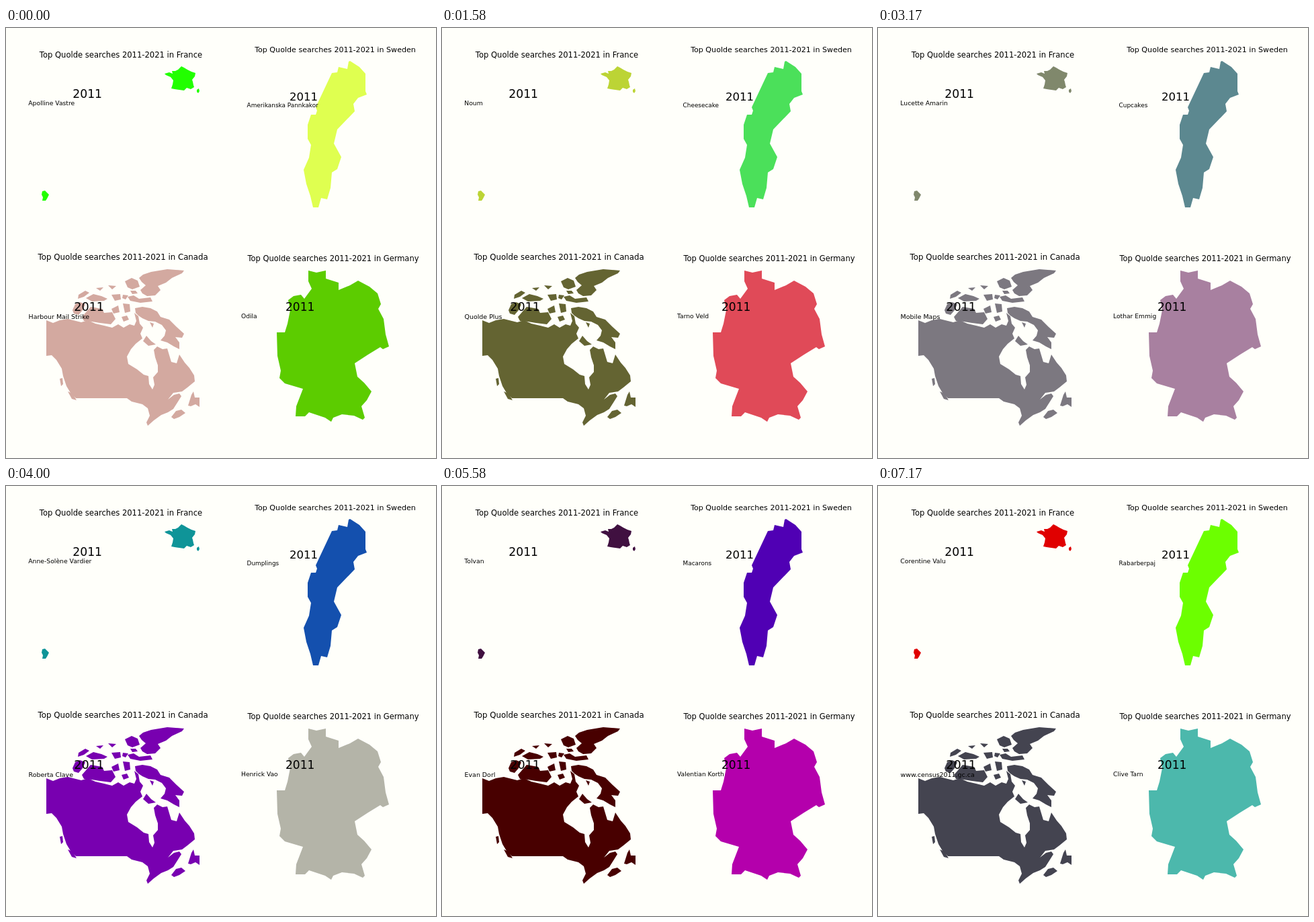
Recreate the animation shown at these times as an HTML page. Size 640 by 640 pixels, loop 8 s.

```html
<!DOCTYPE html>
<html lang="en">
<head>
<meta charset="utf-8">
<title>Top searches by country</title>
<style>
html, body { margin: 0; width: 100%; height: 100%; overflow: hidden; background: #fffffa; }
svg { display: block; width: 100%; height: 100%; }
text { font-family: "DejaVu Sans", sans-serif; fill: #000; }
.title { text-anchor: middle; }
</style>
</head>
<body>
<svg viewBox="0 0 640 640">
  <g id="France">
    <path d="M236 68L243 66 248 68 247 64 252 64 256 62 261 57 265 59 270 62 276 65 282 67 281 72 277 77 278 80 279 85 280 88 275 91 269 89 265 93 258 92 251 91 246 90 248 84 249 78 245 73 238 70Z"/>
    <path d="M284 92L287 90 288 94 286 97 284 95Z"/>
    <path d="M54 243L58 242 61 245 64 248 61 254 59 257 54 257 55 252 53 248Z"/>
  </g>
  <g id="Sweden">
    <path d="M512 49L526 58 535 68 535 94 537 99 524 104 517 113 519 124 493 151 488 172 499 192 493 210 485 215 483 238 478 255 469 253 465 267 457 267 453 250 447 232 443 211 451 193 454 174 449 165 449 144 454 129 461 129 463 123 461 118 485 67 493 66 495 58 508 61 510 50Z"/>
  </g>
  <g id="Canada">
    <path d="M60 435L70 439 80 435 92 433 100 435 112 438 122 435 133 440 146 443 158 446 167 441 175 446 184 441 191 443 194 436 191 424 197 429 199 440 204 446 200 455 203 462 193 470 186 478 180 489 182 500 195 508 205 516 212 518 213 530 218 538 221 531 219 520 226 512 226 502 222 490 220 479 225 474 233 478 240 477 243 487 246 497 254 499 258 486 266 498 273 506 280 517 281 526 270 535 262 541 249 543 241 553 250 546 258 544 261 548 256 556 249 567 241 572 231 576 220 584 211 592 209 587 214 577 211 566 203 560 187 556 180 551 104 551 96 543 90 533 85 518 83 507 75 494 68 487 60 488Z"/>
    <!-- Arctic -->
    <path d="M192 417L203 415 215 417 225 422 230 430 243 434 254 445 265 455 262 461 252 460 258 468 258 478 250 474 240 468 230 465 236 458 238 450 232 442 222 437 212 436 203 432 197 428 193 424Z"/>
    <path d="M198 372L204 367 216 363 240 359 265 361 262 365 247 372 238 379 226 384 230 390 222 398 210 399 203 395 200 390 208 383 202 378Z"/>
    <path d="M177 377L187 372 196 376 199 385 188 389 181 386Z"/>
    <path d="M181 400L190 398 198 403 215 401 218 407 200 409 185 406Z"/>
    <path d="M113 430L126 415 143 418 146 424 158 423 163 433 156 441 140 439 128 437 116 436Z"/>
    <path d="M99 420L103 411 110 408 118 411 114 420 108 427 101 425Z"/>
    <path d="M119 402L130 396 142 399 151 403 146 406 128 407Z"/>
    <path d="M108 397L118 391 124 394 116 400 107 403Z"/>
    <path d="M134 387L145 386 140 391ZM152 383L164 384 158 389ZM185 391L193 391 196 395 188 396Z"/>
    <path d="M157 397L170 396 171 404 162 406ZM174 397L182 398 178 404 173 402Z"/>
    <path d="M157 418L167 413 169 423 160 425ZM174 410L184 411 185 422 177 424ZM172 430L180 428 183 434 175 437Z"/>
    <path d="M204 466L209 458 216 466 223 471 212 473ZM214 438L220 440 218 446Z"/>
    <!-- coasts -->
    <path d="M80 522L84 521 85 530 82 533ZM92 541L99 544 105 554 98 552Z"/>
    <path d="M246 579L253 570 261 568 267 573 258 579 250 582Z"/>
    <path d="M271 562L276 546 279 541 281 550 288 550 288 564 282 560 275 563Z"/>
  </g>
  <g id="Germany">
    <path d="M450 361L462 364 476 361 476 373 495 379 495 390 512 383 524 376 541 385 553 395 558 411 554 418 562 433 565 456 570 474 561 478 557 475 539 486 519 499 523 519 533 528 544 541 537 554 529 563 534 580 531 583 518 577 500 575 487 580 484 586 475 580 451 572 445 578 431 578 432 563 442 537 415 529 407 521 409 510 404 488 403 453 415 453 419 440 423 420 420 405 428 399 439 397 444 403 455 388 450 377Z"/>
  </g>
</svg>
<script>
const LOOP = 8000;
const starts = [0, 830, 1580, 2420, 3170, 4000, 4830, 5580, 6420, 7170];

// title, year and term are [x, baseline]
const panels = [
  {
    country: "France", size: 11.55, title: [171, 44], year: [99.3, 104], term: [33.3, 115.2],
    terms: ["Apolline Vastre", "Blandine Orve", "Noum", "Bvk", "Lucette Amarin",
      "Anne-Solène Vardier", "Mirelle", "Tolvan", "Fanny Hollowick", "Corentine Valu"],
    fills: ["#22ff00", "#8c7850", "#bcd435", "#c22a05", "#80886c",
      "#0f9498", "#887078", "#401040", "#d88a0c", "#e00000"]
  },
  {
    country: "Sweden", size: 11.1, title: [490, 36], year: [422, 108], term: [358.6, 118.2],
    terms: ["Amerikanska Pannkakor", "Chokladboll", "Cheesecake", "Chokadbollar", "Cupcakes",
      "Dumplings", "Kladdkaka", "Macarons", "Pannkakor", "Rabarberpaj"],
    fills: ["#dfff50", "#78a068", "#4be05a", "#1f6878", "#5c8890",
      "#1450ae", "#707890", "#5000b4", "#8cd800", "#6cff00"]
  },
  {
    country: "Canada", size: 11.8, title: [174.2, 345], year: [101.3, 421], term: [33.6, 433.2],
    terms: ["Harbour Mail Strike", "Election Results", "Quolde Plus", "Hugh Larven", "Mobile Maps",
      "Roberta Clave", "Royal Visit", "Evan Dorl", "Drovin", "www.census2011.gc.ca"],
    fills: ["#d3a9a0", "#887c68", "#646432", "#6cb800", "#7c7880",
      "#7800b0", "#785870", "#480000", "#50e400", "#444450"]
  },
  {
    country: "Germany", size: 11.46, title: [487, 347], year: [416, 421], term: [350, 432.2],
    terms: ["Odila", "Bela Kornau", "Tarno Veld", "Leonarda Prandes", "Lothar Emmig",
      "Henrick Vao", "Rieke Solm", "Valentian Korth", "Melina Sorez", "Clive Tarn"],
    fills: ["#5ccc00", "#a08860", "#e04a58", "#b000d0", "#a880a0",
      "#b4b4a8", "#a88098", "#b400ac", "#f8cc54", "#4cb8ac"]
  }
];

const svg = document.querySelector("svg");

function addText([x, y], size, content, className) {
  const el = document.createElementNS(svg.namespaceURI, "text");
  el.setAttribute("x", x);
  el.setAttribute("y", y);
  el.setAttribute("font-size", size);
  if (className) el.setAttribute("class", className);
  el.textContent = content;
  svg.append(el);
  return el;
}

for (const p of panels) {
  p.map = document.getElementById(p.country);
  addText(p.title, p.size, `Top Quolde searches 2011-2021 in ${p.country}`, "title");
  addText(p.year, p.size * 1.49, "2011");
  p.label = addText(p.term, p.size * 0.8, "");
}

let shown = -1;

function draw() {
  const t = performance.now() % LOOP;
  const step = starts.findLastIndex(s => s <= t);
  if (step !== shown) {
    shown = step;
    for (const p of panels) {
      p.map.setAttribute("fill", p.fills[step]);
      p.label.textContent = p.terms[step];
    }
  }
  requestAnimationFrame(draw);
}
draw();
</script>
</body>
</html>
```
